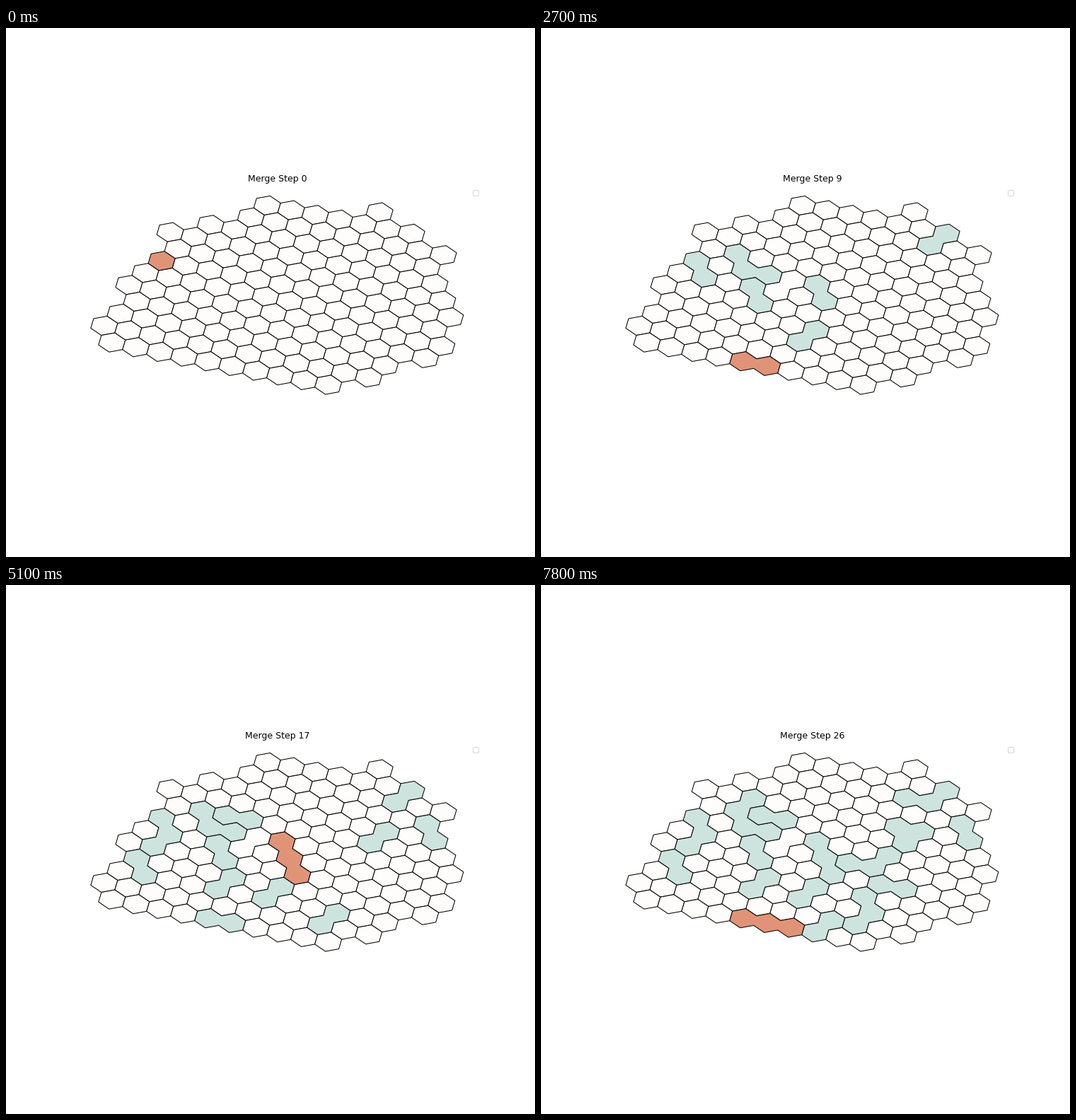
A matplotlib script for the animation above (8 s loop, 748x748 px).

```python
import numpy as np
import matplotlib.pyplot as plt
from matplotlib.animation import FuncAnimation
from matplotlib.collections import PolyCollection

STAGE, DPI = 748, 74.8
WHITE, GREEN, RED = "#fefdfb", "#cde4de", "#e19378"

# Skewed hexagonal lattice in stage pixels, y pointing down
ORIGIN = np.array([220.1, 329.34])
BASIS = np.array([[33.98, 6.65], [10.94, 23.65]])
HEADINGS = np.array([(1, 0), (0, 1), (-1, 1), (-1, 0), (0, -1), (1, -1)])
E, SE, SW, W, NW, NE = range(6)
# Corners lie between neighbouring headings, in thirds of the lattice vectors
CORNERS = HEADINGS + np.roll(HEADINGS, 1, axis=0)

STEPS = 27
INTERVAL, FRAMES_PER_STEP, FRAMES = 100, 3, 80

# Chains in order of appearance: first cell, and where the second one lies
CHAINS = [
    ((4, 0), SW), ((3, 0), W), ((12, -5), SW), ((0, 0), SE), ((2, 1), SE),
    ((5, 0), SE), ((4, 3), SW), ((0, 6), E), ((-2, 3), SE), ((5, 5), NE),
    ((10, -2), SW), ((12, -3), SE), ((3, -1), E), ((2, 3), SW),
    ((8, 0), SW), ((4, 5), SW), ((7, 2), E),
]
# Steps at which an older chain grows instead: chain, turn in sixths
GROWTH = {
    5: (1, 1), 10: (3, 1), 17: (5, 0), 18: (10, 2), 19: (9, -1),
    20: (2, 1), 22: (14, 1), 24: (1, 1), 26: (7, 0),
}


def make_cells():
    """Rows between two parabolas, plus three cells sticking out."""
    cells = [(1, -2), (13, -4), (11, -6)]
    for j in range(-5, 7):
        first = round(0.0485 * j * j - 0.958 * j)
        last = round(11.9 - 0.48 * j - 0.1 * j * j)
        cells += [(i, j) for i in range(first, last + 1)]
    return cells


def neighbour(cell, heading):
    di, dj = HEADINGS[heading % 6]
    return cell[0] + int(di), cell[1] + int(dj)


def outline(region):
    """Closed outer boundary of a connected set of cells."""
    edges = set()
    for cell in region:
        ring = [tuple(p) for p in (3 * np.array(cell) + CORNERS).tolist()]
        edges.update(zip(ring, ring[1:] + ring[:1]))
    following = {p: q for p, q in edges if (q, p) not in edges}
    path = [min(following)]
    while following[path[-1]] != path[0]:
        path.append(following[path[-1]])
    return ORIGIN + np.array(path) @ BASIS / 3


def simulate():
    """Outlines and fills of all regions after every step."""
    cells = make_cells()
    chains, headings, states = [], [], []
    for step in range(STEPS):
        if step in GROWTH:
            newest, turn = GROWTH[step]
            headings[newest] += turn
            chain = chains[newest]
            chain.append(neighbour(chain[-1], headings[newest]))
        elif step > 0:
            newest = len(chains)
            start, heading = CHAINS[newest]
            chains.append([start, neighbour(start, heading)])
            headings.append(heading)

        # The first chain stays white and leaves the highlight at the origin
        taken = {cell for chain in chains for cell in chain}
        regions = [[cell] for cell in cells if cell not in taken] + chains[:1]
        colors = [WHITE] * len(regions)
        regions += chains[1:]
        colors += [GREEN] * len(chains[1:])
        marked = chains[newest] if step > 1 else [(0, 0)]
        k = regions.index(marked)
        regions.append(regions.pop(k))
        colors.pop(k)
        states.append(([outline(r) for r in regions], colors + [RED]))
    return states


states = simulate()

fig, ax = plt.subplots(figsize=(STAGE / DPI, STAGE / DPI), dpi=DPI)
mid_y, half_height = 0.505 * STAGE, 154.4
ax.set_xlim(0.125 * STAGE, 0.9 * STAGE)
ax.set_ylim(mid_y + half_height, mid_y - half_height)
ax.set_aspect("equal")
ax.axis("off")
ax.legend([], [], loc="upper right")
title = ax.set_title("")
hexes = PolyCollection([], edgecolors="black", linewidths=1)
ax.add_collection(hexes, autolim=False)


def update(frame):
    step = frame // FRAMES_PER_STEP
    shapes, colors = states[step]
    hexes.set_verts(shapes)
    hexes.set_facecolor(colors)
    title.set_text(f"Merge Step {step}")
    return hexes, title


anim = FuncAnimation(fig, update, frames=FRAMES, interval=INTERVAL,
                     repeat=True, repeat_delay=0)
plt.show()
```
